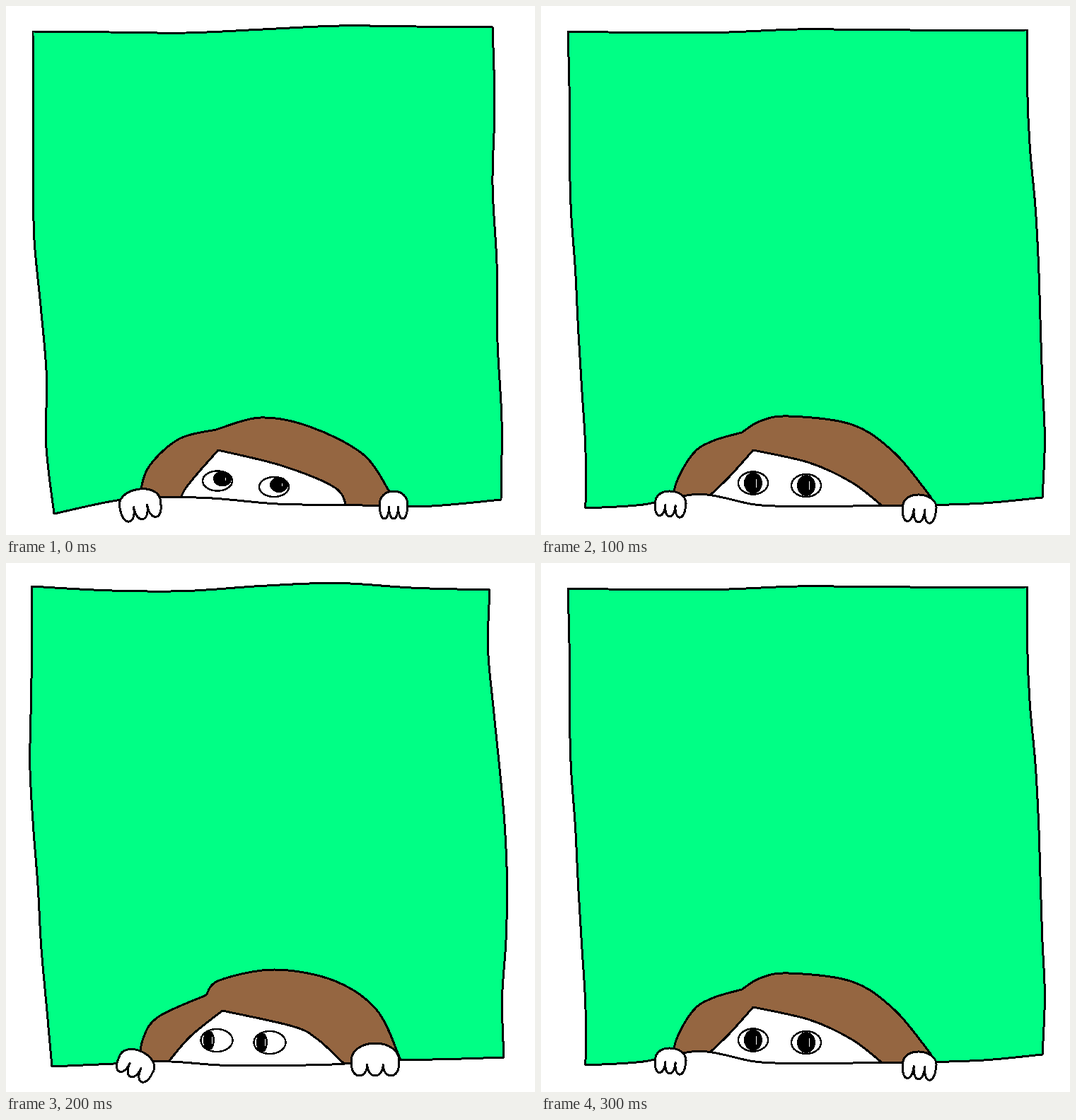
An HTML page that plays this animation: 748x748 px, repeating every 0.4 s.

```html
<!DOCTYPE html>
<html lang="en">
<head>
<meta charset="utf-8">
<title>Peeking over the edge</title>
<style>
  html, body { margin: 0; height: 100%; overflow: hidden; background: #fff; }
  svg { display: block; width: 100vw; height: 100vh; }
  path, ellipse { fill: none; stroke: #000; stroke-width: 3; stroke-linecap: round; stroke-linejoin: round; }
  .wall { fill: #00ff85; stroke: none; }
  .hair { fill: #956641; }
  .skin { fill: #fff; }
  .eye { fill: #fff; stroke-width: 2.5; }
  .pupil { fill: #000; stroke: none; }
  .glint { stroke: #fff; stroke-width: 1; }
</style>
</head>
<body>
<svg id="stage" viewBox="0 0 748 748" shape-rendering="crispEdges"></svg>
<script>
// corners run clockwise from the top left; bends push evenly spaced points
// of the top, right, bottom and left sides off the straight line.
// In hair and face, "|" marks a sharp corner of the curve.
const poses = [
  {
    corners: [[38, 36], [688, 30], [700, 698], [68, 718]],
    bends: [[2, 4, 0, -4, -2], [1, -4, 0, -1, 3], [6, 1, -4, -16, -18], [-7, -2, -6, -11, -8, -4]],
    hair: '190,710 190,688 203,650 245,612 297,599 | 360,582 430,595 505,634 543,688',
    face: '247,715 252,685 300,628 | 390,650 465,681 482,710',
    hands: [
      { x: 190, y: 707, width: 58, rise: 24, reach: 19, tilt: -10 },
      { x: 548, y: 708, width: 39, rise: 22, reach: 17, tilt: 0 }
    ],
    eyes: [[299, 671.5], [379, 680]], eyeSize: [21, 14],
    gaze: [7, -3], pupilSize: [13, 11]
  },
  {
    corners: [[38, 36], [688, 34], [709, 695], [63, 710]],
    bends: [[2, 2, -2, -1, 0], [-3, -2, 3, 5, 5, 5, 6], [6, 7, 6, 5, 1, -16, -3], [3, 1, -1, -2, -5, -4, -1]],
    hair: '188,720 190,678 215,633 243,615 284,603 | 310,587 350,580 440,592 500,632 551,694',
    face: '228,702 265,667 300,628 | 380,646 440,674 484,708',
    hands: [
      { x: 183, y: 706, width: 43, rise: 20, reach: 16, tilt: 5 },
      { x: 535, y: 712, width: 47, rise: 21, reach: 18, tilt: 5 }
    ],
    eyes: [[300, 674.5], [375, 678]], eyeSize: [21, 16],
    gaze: [0, 0], pupilSize: [13, 15]
  },
  {
    corners: [[36, 33], [684, 38], [704, 699], [65, 712]],
    bends: [[5, 5, -3, -8, -2], [-5, 0, 6, 11, 12, 8, 0], [1, 1, 5, 5, 3, -4, -2], [-4, -8, -9, -12, -13, -8, -3]],
    hair: '188,715 193,675 215,642 283,611 | 302,590 380,575 465,591 525,633 558,703',
    face: '226,710 260,670 306,633 | 405,655 440,673 478,708',
    hands: [
      { x: 183, y: 711, width: 52, rise: 22, reach: 17, tilt: 25 },
      { x: 522, y: 709, width: 67, rise: 30, reach: 16, tilt: 0 }
    ],
    eyes: [[298, 675], [373, 678]], eyeSize: [22.5, 16],
    gaze: [-11, 0], pupilSize: [8, 14]
  }
];

// Smooth curve through the points, continuing an already open path.
function spline(points) {
  let d = '';
  for (let i = 1; i < points.length; i++) {
    const from = points[i - 1], to = points[i];
    const before = points[i - 2] || from, after = points[i + 1] || to;
    const leave = from.map((v, k) => v + (to[k] - before[k]) / 6);
    const arrive = to.map((v, k) => v - (after[k] - from[k]) / 6);
    d += `C${leave} ${arrive} ${to}`;
  }
  return d;
}

function outline(text) {
  const parts = text.split('|').map(part => part.trim().split(' ').map(pair => pair.split(',').map(Number)));
  return 'M' + parts[0][0] + parts.map((part, i) => spline(i ? [parts[i - 1].at(-1), ...part] : part)).join('');
}

function wallPath({ corners, bends }) {
  const sides = bends.map((offsets, side) => {
    const from = corners[side], to = corners[(side + 1) % 4];
    const inner = offsets.map((offset, i) => {
      const point = from.map((v, k) => v + (to[k] - v) * (i + 1) / (offsets.length + 1));
      point[(side + 1) % 2] += offset;
      return point;
    });
    return spline([from, ...inner, to]);
  });
  return `M${corners[0]}${sides.join('')}Z`;
}

// A rounded palm with three fingers hanging over the edge.
function hand({ x, y, width, rise, reach, tilt }) {
  const finger = width / 3;
  const palm = `c${-width * 0.1},${-rise * 1.33} ${width * 1.1},${-rise * 1.33} ${width},0`;
  const fingers = `c0,${reach * 1.33} ${-finger},${reach * 1.33} ${-finger},0`.repeat(3);
  return `<path class="skin" transform="translate(${x} ${y}) rotate(${tilt})" d="M${-width / 2},0${palm}${fingers}Z"/>`;
}

const path = (kind, d) => `<path class="${kind}" d="${d}"/>`;
const oval = (kind, x, y, [rx, ry]) => `<ellipse class="${kind}" cx="${x}" cy="${y}" rx="${rx}" ry="${ry}"/>`;

function eye([x, y], { eyeSize, gaze, pupilSize }) {
  const px = x + gaze[0], py = y + gaze[1], shine = pupilSize[1] - 9;
  return oval('eye', x, y, eyeSize) + oval('pupil', px, py, pupilSize) +
    path('glint', `M${px + 4},${py - shine}v${shine * 2}`);
}

function drawPose(pose, i) {
  const wall = wallPath(pose);
  return `<g>
    <clipPath id="opening${i}"><path d="${wall}"/></clipPath>
    ${path('wall', wall)}
    <g clip-path="url(#opening${i})">
      ${path('hair', outline(pose.hair) + 'V740')}
      ${path('skin', outline(pose.face) + 'V740')}
    </g>
    ${path('edge', wall)}
    ${pose.hands.map(hand).join('')}
    ${pose.eyes.map(center => eye(center, pose)).join('')}
  </g>`;
}

const stage = document.getElementById('stage');
stage.innerHTML = poses.map(drawPose).join('');

const groups = [...stage.children];
const order = [0, 1, 2, 1];

function show() {
  const current = order[Math.floor(performance.now() / 100) % order.length];
  groups.forEach((group, i) => group.style.display = i === current ? '' : 'none');
  requestAnimationFrame(show);
}
show();
</script>
</body>
</html>
```
